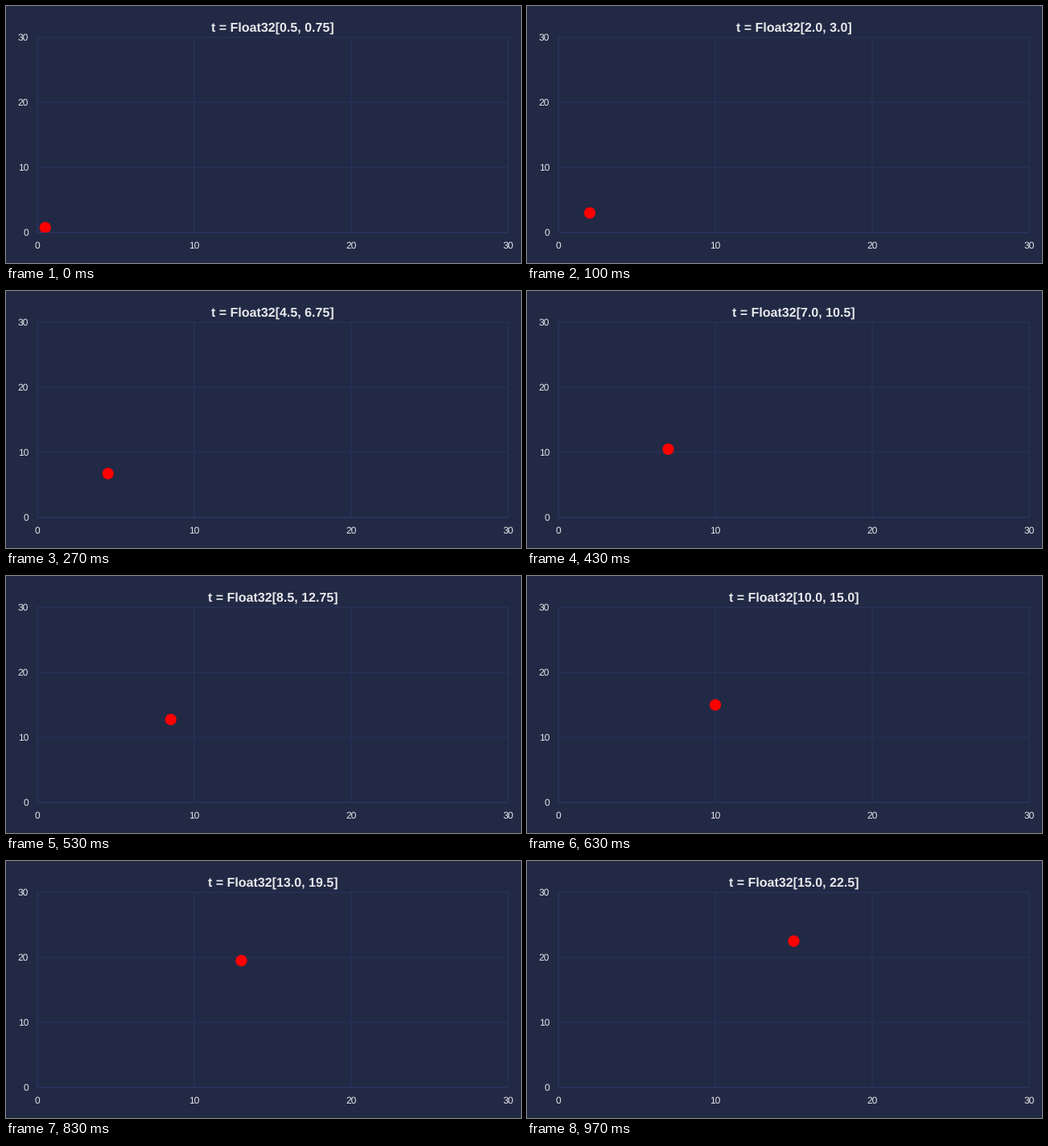
Animation of 640 by 320 pixels, one loop 1.01 s. Source, as a matplotlib script:

```python
import matplotlib.pyplot as plt
from matplotlib.animation import FuncAnimation
from matplotlib.patches import Circle, Rectangle

W, H, DPI = 640, 320, 100
LEFT, RIGHT, TOP, BOTTOM = 39, 624, 39, 282
LIMIT = 30
STEPS = 30
TICK_MS, LOOP_MS = 10, 1010
BACKGROUND, GRID, INK = "#222945", "#28365f", "#e6e8ea"

plt.rcParams["font.family"] = "Liberation Sans"
plt.rcParams["text.hinting"] = "none"


def points(pixels):
    return pixels * 72 / DPI


def to_stage(x, y):
    return (LEFT + x / LIMIT * (RIGHT - LEFT),
            BOTTOM - y / LIMIT * (BOTTOM - TOP))


def line(xs, ys):
    ax.plot(xs, ys, color=GRID, lw=points(1), snap=False,
            solid_capstyle="butt", zorder=1)


def label(x, y, text, size, align="center", **style):
    return ax.text(x, y, text, size=points(size), color=INK, ha=align,
                   va="baseline", zorder=3, **style)


fig = plt.figure(figsize=(W / DPI, H / DPI), dpi=DPI, facecolor=BACKGROUND)
ax = fig.add_axes([0, 0, 1, 1])
ax.set_xlim(0, W)
ax.set_ylim(H, 0)
ax.axis("off")

for value in range(0, LIMIT + 1, 10):
    x, y = to_stage(value, value)
    line([x, x], [TOP, BOTTOM])
    line([LEFT, RIGHT], [y, y])
    label(x, 302.3, str(value), 12)
    label(28.2, y + 4.3, str(value), 12, "right")

# The two axis lines lie over the grid.
line([LEFT, LEFT], [TOP, BOTTOM])
line([LEFT, RIGHT], [BOTTOM, BOTTOM])

title = label((LEFT + RIGHT) / 2, 32, "", 16, weight="bold")
dot = Circle((0, 0), 7.1, facecolor="#ff0000", edgecolor="none", zorder=2)
ax.add_patch(dot)
dot.set_clip_path(Rectangle((LEFT, TOP), RIGHT - LEFT, BOTTOM - TOP,
                            transform=ax.transData))


def update(tick):
    # Thirty steps per second, rounded to hundredths of a second.
    step = min(STEPS - 1, (3 * tick + 1) // 10)
    x, y = 0.5 * (step + 1), 0.75 * (step + 1)
    dot.center = to_stage(x, y)
    title.set_text(f"t = Float32[{x}, {y}]")
    return dot, title


animation = FuncAnimation(fig, update, frames=LOOP_MS // TICK_MS,
                          interval=TICK_MS, repeat=True, repeat_delay=0)
plt.show()
```
